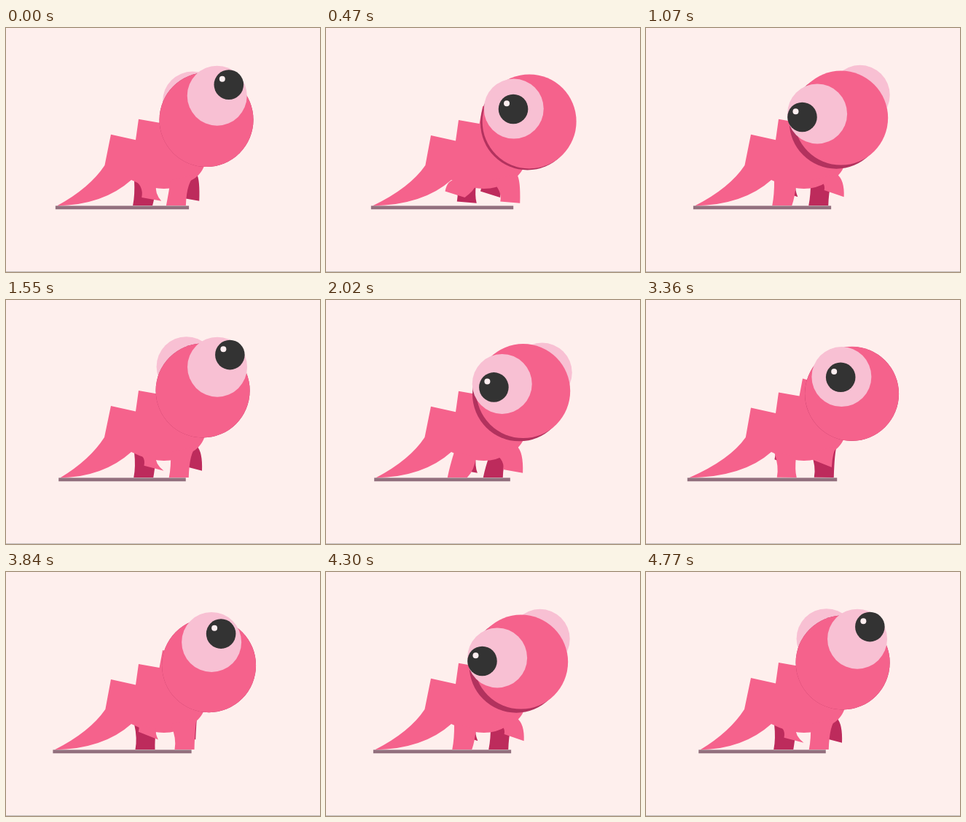
An HTML page with a canvas for the animation above (4840 ms loop, 431 by 334 pixels).

```html
<!DOCTYPE html>
<html lang="en">
<head>
<meta charset="utf-8">
<title>Walking dinosaur</title>
<style>
  html, body { margin: 0; width: 100%; height: 100%; overflow: hidden; background: #feefed; }
  canvas { display: block; width: 431px; height: 334px; }
</style>
</head>
<body>
<canvas id="stage"></canvas>
<script>
const W = 431, H = 334, FLOOR = 243;
const LOOP = 4840, STEPS = 72, CYCLE = 12; // six walk cycles of twelve steps
const BG = '#feefed', PINK = '#f5628c', LIGHT = '#f8c0d3', DARK = '#bd2b5c', SHADE = '#b2325e';

const canvas = document.getElementById('stage');
const ctx = canvas.getContext('2d');
const dpr = window.devicePixelRatio || 1;
canvas.width = W * dpr;
canvas.height = H * dpr;
ctx.scale(dpr, dpr);

// Swing once per cycle, or once per stride (twice per cycle), highest at step `peak`
const sway = (step, peak) => Math.cos((step - peak) / CYCLE * 2 * Math.PI);
const bounce = (step, peak) => Math.cos((step - peak) / CYCLE * 4 * Math.PI);

function disc(x, y, r, color) {
  ctx.fillStyle = color;
  ctx.beginPath();
  ctx.arc(x, y, r, 0, Math.PI * 2);
  ctx.fill();
}

// Corners of a foot: a quick swing forward, then a steady slide back on the floor
function foot(step, x, reach) {
  const p = (step % CYCLE + CYCLE) % CYCLE;
  const swinging = p >= 1 && p < 5;
  const travel = swinging
    ? 2 * Math.sin((p - 1) / 4 * Math.PI / 2) - 1
    : 1 - ((p + 7) % CYCLE) / 4;
  const air = Math.min(1, Math.max(0, (p - 0.3) / 8.1));
  const lift = Math.max(0, 21 * Math.sin(Math.PI * Math.sqrt(air)) - 1.5);
  const cx = x + reach * travel, cy = FLOOR - lift, tilt = lift * 0.28;
  return { x1: cx - 13.5, y1: cy - tilt, x2: cx + 13.5, y2: cy + tilt };
}

function leg(hipX, hipY, f, bendX, bendY, endX, endY, color) {
  ctx.fillStyle = color;
  ctx.beginPath();
  ctx.moveTo(hipX, hipY);
  ctx.quadraticCurveTo(f.x1 + 3, f.y1 - 15, f.x1, f.y1);
  ctx.lineTo(f.x2, f.y2);
  ctx.quadraticCurveTo(bendX, bendY, endX, endY);
  ctx.fill();
}

const frontLeg = (f, color) => leg(226, 208, f, f.x2 + 1, 208, 262, 200, color);
const hindLeg = (f, color) => leg(176, 208, f, 204, f.y2 - 10, 206, 214, color);

function body(tip, dy) {
  ctx.fillStyle = PINK;
  ctx.beginPath();
  ctx.moveTo(tip, 243.5);
  ctx.quadraticCurveTo(115, 219, 135 + dy * 0.7, 188);
  for (const [x, y] of [[144, 145], [178, 152.5], [182, 124], [210.5, 129], [215, 105], [240, 112]])
    ctx.lineTo(x, y + dy);
  ctx.lineTo(273, 186);
  ctx.quadraticCurveTo(267, 205, 248, 211);
  ctx.quadraticCurveTo(222, 228, 183, 213);
  ctx.lineTo(172, 208);
  ctx.quadraticCurveTo(134, 242, tip, 243.5);
  ctx.fill();
}

function draw(step) {
  const opposite = step + CYCLE / 2;
  const shadow = 95.1 - 2.75 * sway(step, 9.6) - 5.8 * bounce(step, 4.95);
  const left = 159.5 - shadow;
  const dy = 1.3 + 1.3 * bounce(step, 2);

  const hx = 275.1 + 2.5 * sway(step, 11) + 7.7 * bounce(step, 1.78);
  const hy = 126 + sway(step, 10) + 2.9 * bounce(step, 1.8);

  // Eyes relative to the head, pupil relative to its eye; heights follow from the turn
  const nx = -9.3 + 26.5 * sway(step, 10.85) + 2.95 * bounce(step, 5.28);
  const ny = 0.0132 * (nx - 13) ** 2 - 33;
  const fx = 3.5 + 26 * sway(step, 5);
  const fy = -23.5 - 10 * bounce(step, 4.65);
  const px = 1.1 + 19 * sway(step, 10.54) + 3.55 * bounce(step, 1.15);
  const py = -0.62 * px - 0.0195 * px ** 2;
  const shade = Math.max(0, (-nx - 14) * 0.28);

  ctx.fillStyle = BG;
  ctx.fillRect(0, 0, W, H);

  disc(hx + fx, hy + fy, 41, LIGHT);
  hindLeg(foot(step, 191, 4.5), DARK);
  frontLeg(foot(opposite, 240.5, 15), DARK);
  body(left + 2, dy);
  hindLeg(foot(opposite, 190, 13), PINK);
  frontLeg(foot(step, 245, 15.5), PINK);

  disc(hx - shade * 1.25, hy + shade, 64.5, SHADE);
  disc(hx, hy, 64.5, PINK);

  const ex = hx + nx, ey = hy + ny;
  disc(ex, ey, 41, LIGHT);
  disc(ex + px, ey + py, 20.3, '#333333');
  disc(ex + px - 9, ey + py - 7.8, 4, '#fdeef0');

  ctx.fillStyle = '#92707e';
  ctx.fillRect(left, 243.4, 2 * shadow, 4.8);
  ctx.fillStyle = '#c4bcbb';
  ctx.fillRect(0, H - 1, W, 1);
}

const start = performance.now();
function tick() {
  const t = (performance.now() - start + 9) % LOOP;
  draw(Math.floor(t / LOOP * STEPS) % CYCLE);
  requestAnimationFrame(tick);
}
tick();
</script>
</body>
</html>
```
